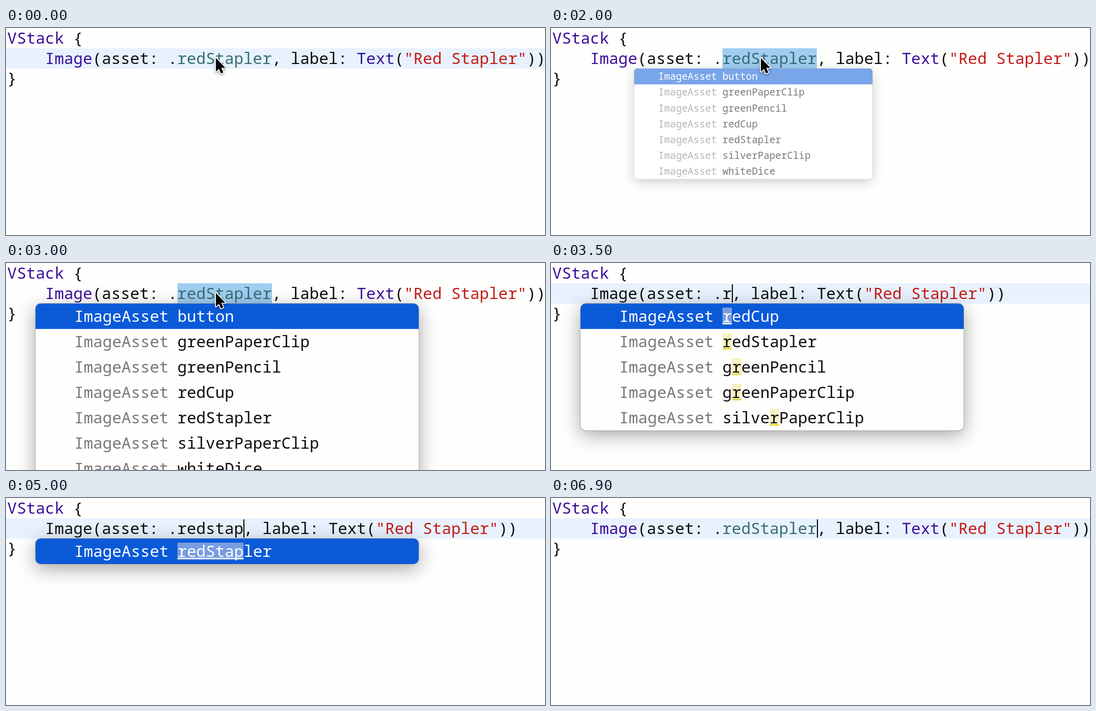
Animation of 1058x408 px, one loop 7 s. Source, as an HTML page with a canvas:

```html
<!DOCTYPE html>
<html lang="en">
<head>
<meta charset="utf-8">
<title>Code completion</title>
<style>
  html, body { margin: 0; width: 100%; height: 100%; overflow: hidden; background: #fefefd; }
  canvas { display: block; }
</style>
</head>
<body>
<canvas id="stage" width="1058" height="408"></canvas>
<script>
const ctx = document.getElementById('stage').getContext('2d');

const LOOP = 7000, STEP = 100;
const SELECT_AT = 300, POPUP_AT = 1835, POPUP_TIME = 300, TYPE_AT = 3500, ACCEPT_AT = 5500, COLOUR_AT = 5900;
const KEYS = [[3500, 'r'], [3800, 'e'], [4100, 'd'], [4500, 's'], [4700, 't'], [4800, 'a'], [5000, 'p']];

const PAPER = '#fefefd', INK = '#0c0c0c', PURPLE = '#3b0d9a', GREEN = '#356d74', RED = '#c41a16';
const FONT = '500 30.9px "Noto Sans Mono", "DejaVu Sans Mono", monospace';
const CHAR = 18.54, LEFT = 2.6, NAME_X = 336.5, TYPE_X = 134;
const POPUP = { x: 58, y: 80, w: 752, row: 50 };
const ASSETS = ['button', 'greenPaperClip', 'greenPencil', 'redCup', 'redStapler', 'silverPaperClip', 'whiteDice'];

function rect(x, y, w, h, colour) {
  ctx.fillStyle = colour;
  ctx.fillRect(x, y, w, h);
}

function write(text, x, y, colour) {
  ctx.fillStyle = colour;
  ctx.fillText(text, x, y);
}

function writeRuns(runs, x, y) {
  for (const [text, colour] of runs) {
    write(text, x, y, colour);
    x += text.length * CHAR;
  }
}

function drawCode(name, coloured) {
  const type = coloured ? PURPLE : INK;
  writeRuns([['VStack', PURPLE], [' {', INK]], LEFT, 31);
  writeRuns([
    ['    Image', type], ['(asset: .', INK], [name, coloured ? GREEN : INK],
    [', label: ', INK], ['Text', type], ['(', INK], ['"Red Stapler"', RED], ['))', INK]
  ], LEFT, 71);
  write('}', LEFT, 110, INK);
}

function findMatches(query) {
  const found = ASSETS
    .map(name => ({ name, at: name.toLowerCase().indexOf(query) }))
    .filter(m => m.at >= 0);
  return query ? found.sort((a, b) => a.at - b.at || a.name.length - b.name.length) : found;
}

function drawRow({ name, at }, i, query) {
  const y = POPUP.y + i * POPUP.row, active = i === 0;
  if (active) rect(POPUP.x, y, POPUP.w, POPUP.row, '#0a5ad8');
  if (query) {
    const x = NAME_X + at * CHAR, w = query.length * CHAR;
    rect(x, y + 8, w, 34, active ? '#789de0' : '#f7f2c0');
    rect(x, y + 38, w, 2, active ? '#fff' : '#e6cf20');
  }
  write('ImageAsset', TYPE_X, y + 36, active ? '#fff' : '#787878');
  write(name, NAME_X, y + 36, active ? '#fff' : INK);
}

// The shadow is kept outside the box so that it never tints a fading popup.
function drawShadow(box, strength, scale) {
  const outside = new Path2D(box);
  outside.rect(-2000, -2000, 6000, 6000);
  ctx.save();
  ctx.clip(outside, 'evenodd');
  ctx.shadowColor = `rgba(0, 0, 0, ${0.36 * strength})`;
  ctx.shadowBlur = 36 * scale;
  ctx.shadowOffsetY = 9 * scale;
  ctx.fillStyle = PAPER;
  ctx.fill(box);
  ctx.restore();
}

function drawPopup(query, progress) {
  const matches = findMatches(query), scale = 1 - 0.84 * (1 - progress);
  const box = new Path2D();
  box.roundRect(POPUP.x, POPUP.y, POPUP.w, matches.length * POPUP.row, 10);

  ctx.save();
  ctx.translate(NAME_X, POPUP.y);
  ctx.scale(scale, scale);
  ctx.translate(-NAME_X, -POPUP.y);

  drawShadow(box, progress, scale);
  ctx.strokeStyle = `rgba(160, 160, 160, ${progress})`;
  ctx.lineWidth = 1.5;
  ctx.stroke(box);
  ctx.clip(box);
  ctx.fillStyle = PAPER;
  ctx.fill(box);
  matches.forEach((match, i) => drawRow(match, i, query));
  ctx.globalAlpha = 1 - progress;
  ctx.fillStyle = PAPER;
  ctx.fill(box);
  ctx.restore();
}

function drawPointer() {
  const arrow = new Path2D('M412 59V86L418 80.5L422 89.5L426.5 87.5L422.5 78.5H430.5Z');
  ctx.save();
  ctx.lineJoin = 'round';
  ctx.lineWidth = 3.5;
  ctx.strokeStyle = '#fff';
  ctx.shadowColor = 'rgba(0, 0, 0, 0.4)';
  ctx.shadowBlur = 4;
  ctx.shadowOffsetY = 2;
  ctx.stroke(arrow);
  ctx.restore();
  ctx.fillStyle = '#000';
  ctx.fill(arrow);
}

function draw(t) {
  const query = KEYS.filter(([at]) => t >= at).map(([, key]) => key).join('');
  const typing = t >= TYPE_AT, accepted = t >= ACCEPT_AT;
  const name = typing && !accepted ? query : 'redStapler';
  const selected = t >= SELECT_AT && !typing;

  rect(0, 0, 1058, 408, PAPER);
  if (selected) rect(NAME_X, 40, 10 * CHAR, 40, '#a0cdf0');
  else rect(0, 40, 1058, 40, '#e8f2fe');

  ctx.font = FONT;
  drawCode(name, !typing || t >= COLOUR_AT);
  if (typing) rect(Math.round(NAME_X + name.length * CHAR), 42, 2, 36, '#000');
  if (t > POPUP_AT && !accepted) drawPopup(query, Math.min(1, (t - POPUP_AT) / POPUP_TIME));
  if (!typing) drawPointer();
}

function tick() {
  const t = performance.now() % LOOP;
  draw(Math.floor(t / STEP) * STEP);
  requestAnimationFrame(tick);
}
tick();
</script>
</body>
</html>
```
